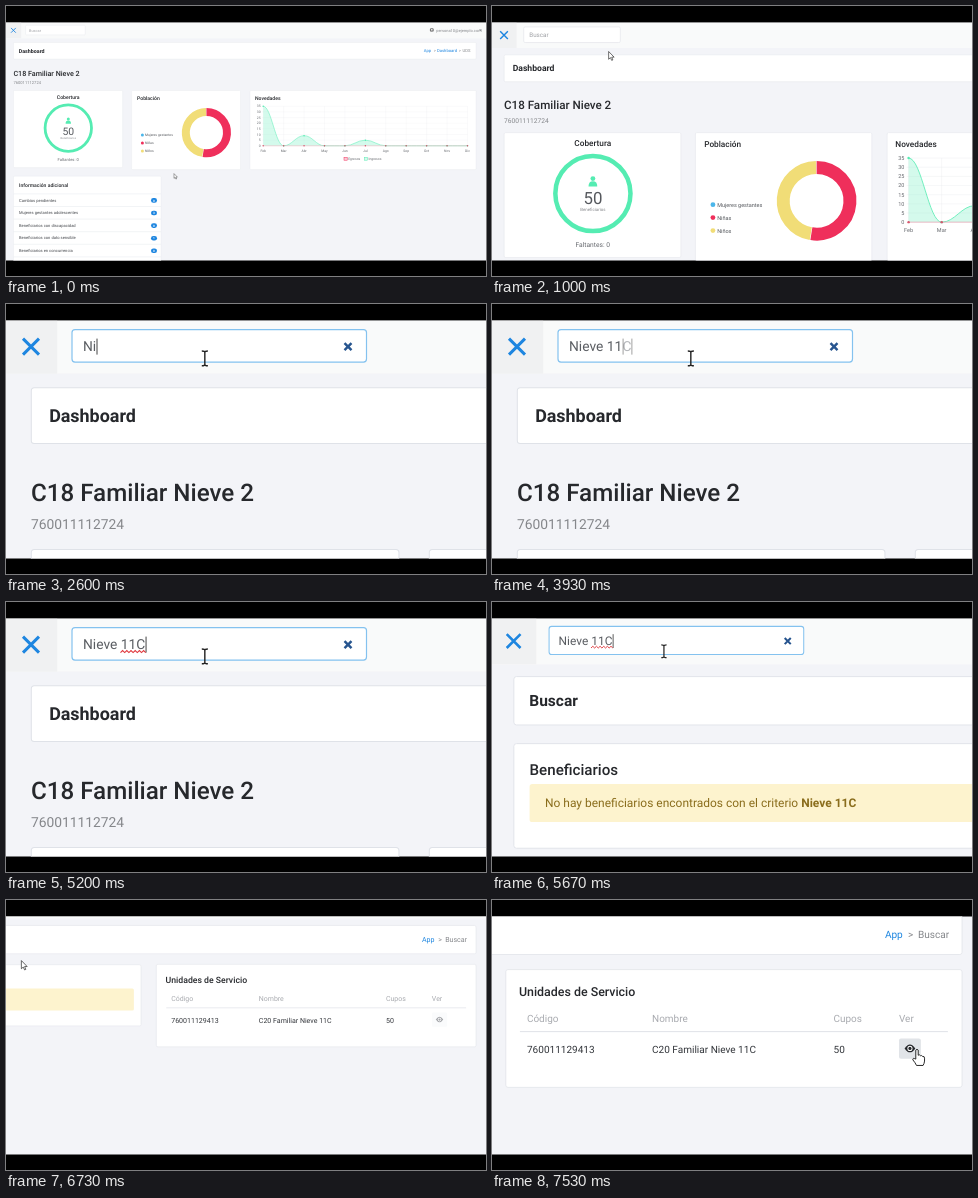
An HTML page for the animation above (8000 ms loop, 480 px wide and 270 px high).

```html
<!DOCTYPE html>
<html lang="es">
<head>
<meta charset="utf-8">
<title>Dashboard</title>
<style>
  html, body { margin: 0; width: 100%; height: 100%; overflow: hidden; background: #000; }
  svg { display: block; width: 480px; height: 270px; }
  text { font-family: Roboto, "Open Sans", sans-serif; text-rendering: geometricPrecision; white-space: pre; }
</style>
</head>
<body>
<svg id="stage" viewBox="0 0 480 270">
  <clipPath id="view"><rect y="16.6" width="480" height="238"/></clipPath>
  <rect width="480" height="270"/>
  <g clip-path="url(#view)">
    <rect y="16" width="480" height="240" fill="#f3f4f8"/>
    <g id="cam"></g>
  </g>
</svg>
<script>
const NS = 'http://www.w3.org/2000/svg';
const LOOP = 8000, ZOOM = 3.37, BLINK = 565, VIEW_Y = 16.6;
const BLUE = '#1e86e0', MINT = '#55ecb2', RED = '#ef2f5b', YELLOW = '#f1dd77';
const INK = '#26282c', GREY = '#85878b', EDGE = '#dfe2e8';
const QUERY = 'Nieve 11C';

const $ = id => document.getElementById(id);

function el(parent, tag, attrs = {}, content) {
  const node = document.createElementNS(NS, tag);
  for (const k in attrs) node.setAttribute(k, attrs[k]);
  if (content !== undefined) node.textContent = content;
  parent.appendChild(node);
  return node;
}
const group = (p, transform = '') => el(p, 'g', { transform });
const text = (p, x, y, size, str, fill = INK, more = {}) =>
  el(p, 'text', { x, y, 'font-size': size, fill, ...more }, str);
const rect = (p, x, y, width, height, fill, more = {}) =>
  el(p, 'rect', { x, y, width, height, fill, ...more });
const path = (p, d, stroke, width, fill = 'none', more = {}) =>
  el(p, 'path', { d, stroke, 'stroke-width': width, fill, ...more });
const card = (p, x1, y1, x2, y2) =>
  rect(p, x1, y1, x2 - x1, y2 - y1, '#fff', { stroke: EDGE, 'stroke-width': .3, rx: .9 });
const show = (node, on) => node.setAttribute('visibility', on ? 'visible' : 'hidden');

const MED = { 'font-weight': 500 }, BOLD = { 'font-weight': 700 };
const MID = { 'text-anchor': 'middle' }, END = { 'text-anchor': 'end' };

const cam = $('cam');
const page = group(cam, 'translate(0 -16)');
rect(page, 0, 16, 480, 15.7, '#f9fafa');
rect(page, 0, 16, 15.2, 15.7, '#f0f1f2');
card(page, 7.5, 35.9, 470, 52.5);
const dash = group(page), found = group(page);
const bar = group(page, `translate(0 16) scale(${1 / ZOOM})`);
const pointer = group(page);

// Top bar
path(bar, 'M17 18L33 34M33 18L17 34', BLUE, 3);
const userMark = group(bar, 'translate(1435 25)');
el(userMark, 'circle', { r: 7, fill: '#777' });
el(userMark, 'circle', { cy: -2, r: 2.6, fill: '#f9fafa' });
path(userMark, 'M-4.5 4Q0 -1 4.5 4', 'none', 0, '#f9fafa');
text(bar, 1450, 30, 13.4, 'persona10@ejemplo.com', GREY);
path(bar, 'M1594 23h10l-5 5z', 'none', 0, GREY);

const box = rect(bar, 66, 9, 201, 32.5, '#fff', { rx: 3, 'stroke-width': 1.2 });
const hint = text(bar, 77.5, 30.3, 13, 'Buscar', '#a0a2a6');
const typed = text(bar, 77, 30.3, 13.8, '', '#5a5d62');
const ghost = text(bar, 131.5, 30.3, 13.8, 'C', '#b4b6ba');
const carets = [0, 1].map(() => rect(bar, 77, 18, 1, 16, '#444'));
const clear = path(bar, 'M338.5 22.5l7 7m0 -7l-7 7', '#27558f', 2.4);
let wave = 'M114.5 34';
for (let i = 0; i < 12; i++) wave += `l2.1 ${i % 2 ? 2 : -2}`;
const squiggle = path(bar, wave, '#e0393e', 1.1);

// Dashboard page
text(dash, 12.8, 46, 5.32, 'Dashboard', INK, BOLD);
[[417.8, 'App', BLUE], [427.8, '>', GREY], [431, 'Dashboard', BLUE], [452.8, '>', GREY], [456.6, 'UDS', GREY]]
  .forEach(([x, s, c]) => text(dash, x, 45.6, 4.15, s, c));
text(dash, 7.4, 69.6, 7.18, 'C18 Familiar Nieve 2', INK, MED);
text(dash, 7.4, 77.8, 4.1, '760011112724', GREY);

card(dash, 7.5, 83.9, 116.6, 161);
text(dash, 62.2, 92, 5.1, 'Cobertura', INK, { ...MED, ...MID });
el(dash, 'circle', { cx: 62.3, cy: 121.5, r: 23.2, fill: 'none', stroke: MINT, 'stroke-width': 2.8 });
el(dash, 'circle', { cx: 62.3, cy: 112.3, r: 1.5, fill: MINT });
path(dash, 'M59.6 117.2q0 -3.2 2.7 -3.2t2.7 3.2z', 'none', 0, MINT);
text(dash, 62.3, 128, 10.4, '50', '#55585d', MID);
text(dash, 62.3, 132.4, 2.7, 'Beneficiarios', GREY, MID);
text(dash, 62.2, 154.8, 4.1, 'Faltantes: 0', '#66696e', MID);

card(dash, 125.6, 83.9, 234.5, 163);
text(dash, 131, 93, 5.1, 'Población', INK, MED);
[['Mujeres gestantes', '#4bb6ea'], ['Niñas', RED], ['Niños', YELLOW]].forEach(([s, c], i) => {
  el(dash, 'circle', { cx: 136.4, cy: 128.4 + i * 8, r: 1.5, fill: c });
  text(dash, 139, 129.6 + i * 8, 3.4, s, '#55585d');
});
function arc(from, to, color) {
  const at = a => {
    const r = a * Math.PI / 180;
    return `${200.4 + 20.6 * Math.sin(r)} ${126 - 20.6 * Math.cos(r)}`;
  };
  path(dash, `M${at(from)}A20.6 20.6 0 ${to - from > 180 ? 1 : 0} 1 ${at(to)}`, color, 8);
}
arc(0, 189, RED);
arc(190, 359, YELLOW);

card(dash, 244, 83.9, 470, 163);
text(dash, 249, 93, 5.1, 'Novedades', INK, MED);
const months = ['Feb', 'Mar', 'Abr', 'May', 'Jun', 'Jul', 'Ago', 'Sep', 'Oct', 'Nov', 'Dic'];
const joins = [35, 0, 9, 0, 0, 5, 0, 0, 0, 0, 0];
const px = i => 257.2 + i * 20.43, py = v => 139.2 - v * 1.13;
for (let v = 0; v <= 35; v += 5) {
  path(dash, `M256 ${py(v)}H${px(10)}`, '#e9eaed', .25);
  text(dash, 254.6, py(v) + 1.2, 3.4, v, '#66696e', END);
}
let curve = `M${px(0)} ${py(joins[0])}`;
joins.slice(1).forEach((v, i) => {
  curve += `C${px(i + .4)} ${py(joins[i])} ${px(i + .6)} ${py(v)} ${px(i + 1)} ${py(v)}`;
});
months.forEach((m, i) => {
  path(dash, `M${px(i)} ${py(35)}V140.4`, '#e9eaed', .25);
  text(dash, px(i), 145.2, 3.4, m, '#66696e', MID);
});
path(dash, `${curve}L${px(0)} ${py(0)}Z`, 'none', 0, MINT, { opacity: .25 });
path(dash, curve, MINT, .5);
path(dash, `M${px(0)} ${py(0)}H${px(10)}`, '#f08c9f', .35);
joins.forEach((v, i) => {
  el(dash, 'circle', { cx: px(i), cy: py(v), r: .75, fill: MINT });
  el(dash, 'circle', { cx: px(i), cy: py(0), r: .75, fill: '#d9556d' });
});
[[338, 'Egresos', RED], [358.3, 'Ingresos', MINT]].forEach(([x, s, c]) => {
  rect(dash, x, 150.8, 3.2, 2.8, c, { 'fill-opacity': .25, stroke: c, 'stroke-width': .5 });
  text(dash, x + 4.2, 153.5, 3.4, s, '#66696e');
});

card(dash, 7.5, 169.6, 155, 262);
text(dash, 13, 180, 5.05, 'Información adicional', INK, MED);
[['Cambios pendientes', 0], ['Mujeres gestantes adolescentes', 3], ['Beneficiarios con discapacidad', 0],
 ['Beneficiarios con dato sensible', 1], ['Beneficiarios en concurrencia', 0]].forEach(([s, n], i) => {
  const y = 187.3 + i * 12.6;
  path(dash, `M7.5 ${y}H155`, EDGE, .4);
  text(dash, 13, y + 7.8, 4.1, s, '#44474c');
  rect(dash, 145, y + 4.2, 6, 4.6, BLUE, { rx: 2.3 });
  text(dash, 148, y + 7.7, 3.1, n, '#fff', { ...MID, ...BOLD });
});
path(dash, 'M7.5 250.3H155', EDGE, .4);

// Search page
text(found, 12.8, 46, 5.32, 'Buscar', INK, BOLD);
[[438.3, 'App', BLUE], [447.8, '>', GREY], [451.9, 'Buscar', GREY]]
  .forEach(([x, s, c]) => text(found, x, 45.6, 4.15, s, c));
card(found, 7.5, 58.9, 273.5, 94.8);
text(found, 12.9, 69.6, 5.2, 'Beneficiarios', INK, MED);
rect(found, 12.9, 72.8, 256.4, 13, '#fdf3ce', { rx: .9 });
const note = text(found, 18.2, 80.6, 4.11, 'No hay beneficiarios encontrados con el criterio ', '#8a6d1c');
el(note, 'tspan', BOLD, QUERY);

card(found, 282.5, 58.7, 470, 107.1);
text(found, 287.9, 69.4, 5.1, 'Unidades de Servicio', INK, MED);
[[291.2, 'Código', '760011129413'], [342.6, 'Nombre', 'C20 Familiar ' + QUERY],
 [417.2, 'Cupos', '50'], [444.1, 'Ver', '']].forEach(([x, head, value]) => {
  text(found, x, 80.1, 4.1, head, '#a9abb0');
  text(found, x, 93.2, 4.13, value, '#33363b');
});
path(found, 'M288.3 84.2H464.2', EDGE, .4);
const button = rect(found, 444.1, 87, 9, 8.3, '#e1e4e8', { rx: .8 });
const eye = group(found, 'translate(448.6 91.1)');
path(eye, 'M-2.2 0Q0 -3.2 2.2 0Q0 3.2 -2.2 0z', 'none', 0, 'currentColor');
el(eye, 'circle', { r: 1.05, fill: '#fff' });
el(eye, 'circle', { r: .65, fill: 'currentColor' });

// Pointer shapes
const shapes = {
  arrow: path(pointer, 'M0 0V4.8L1.1 3.8L1.9 5.5L2.6 5.2L1.9 3.5H3.4z', '#222', .4, '#fff'),
  beam: path(pointer, 'M-.9 -2.2Q0 -2.2 0 -1.8Q0 -2.2 .9 -2.2M0 -1.8V1.8M-.9 2.2Q0 2.2 0 1.8Q0 2.2 .9 2.2', '#222', .42),
  hand: path(pointer, 'M-.5 .5Q0 -.2 .5 .5V2.6Q1.1 2.2 1.4 2.8Q2 2.5 2.3 3.1Q3.1 2.9 3.1 3.8V5Q3 6 2.5 6.8H-.2Q-.7 5.7 -1.7 4.5Q-1.9 3.5 -.5 4.2z', '#222', .4, '#fff')
};

// Rows: time, then values
const camKeys = [[800, 1, 0, 0], [1400, ZOOM, 0, 0], [5480, ZOOM, 0, 0], [6160, 1, 0, 0],
  [6370, 1, 0, 0], [7100, 2.433, -673.5, -50.9]];
const mouseKeys = [[50, 168, 167], [670, 88, 42], [830, 88, 42], [1150, 59, 27.2], [6370, 59, 27.2],
  [7130, 371, 90.5], [7210, 371, 90.5], [7480, 451.5, 91.3]];
const boxKeys = [[1770, 201], [2000, 294.5]];
const strokes = [2200, 2530, 2800, 3070, 3130, 3200, 3330, 3400, 4000];

function track(keys, t) {
  const i = keys.findIndex(k => k[0] > t);
  if (i === 0) return keys[0].slice(1);
  if (i < 0) return keys[keys.length - 1].slice(1);
  const a = keys[i - 1], b = keys[i], u = (t - a[0]) / (b[0] - a[0]);
  const e = u * u * (3 - 2 * u);
  return a.slice(1).map((v, j) => v + (b[j + 1] - v) * e);
}

function draw(t) {
  const [z, dx, dy] = track(camKeys, t);
  cam.setAttribute('transform', `translate(${dx} ${VIEW_Y + dy}) scale(${z})`);

  const searched = t >= 5530;
  show(dash, !searched);
  show(found, searched);

  const n = strokes.filter(s => s <= t).length;
  const focus = t >= 1200, fading = t >= 3930 && t < 4000;
  box.setAttribute('width', track(boxKeys, t)[0]);
  box.setAttribute('stroke', focus ? '#84c2ef' : EDGE);
  typed.textContent = QUERY.slice(0, n);
  show(hint, !n);
  show(clear, n > 0);
  show(ghost, fading);
  show(squiggle, t >= 5130);

  const last = n ? strokes[n - 1] : 1270;
  const lit = t >= 1270 && Math.floor((t - last) / BLINK) % 2 === 0;
  const end = 77.3 + (n ? typed.getComputedTextLength() : 0);
  ghost.setAttribute('x', end);
  carets.forEach((c, i) => {
    c.setAttribute('x', end + i * 8.8);
    c.setAttribute('opacity', fading ? .5 : 1);
    show(c, fading || (lit && i === 0));
  });

  const [mx, my] = track(mouseKeys, t);
  pointer.setAttribute('transform', `translate(${mx} ${my})`);
  const over = searched && mx > 444 && my > 87;
  const onText = (mx < 80 && my < 29) || (searched && mx > 342 && mx < 388 && my > 87);
  const kind = over ? 'hand' : onText ? 'beam' : 'arrow';
  for (const k in shapes) shapes[k].setAttribute('display', k === kind ? 'inline' : 'none');
  button.setAttribute('fill', over ? '#e1e4e8' : '#fafbfc');
  eye.setAttribute('color', over ? '#26282c' : '#a4a6aa');
}

const start = performance.now();
function tick() {
  draw((performance.now() - start) % LOOP);
  requestAnimationFrame(tick);
}
tick();
</script>
</body>
</html>
```
